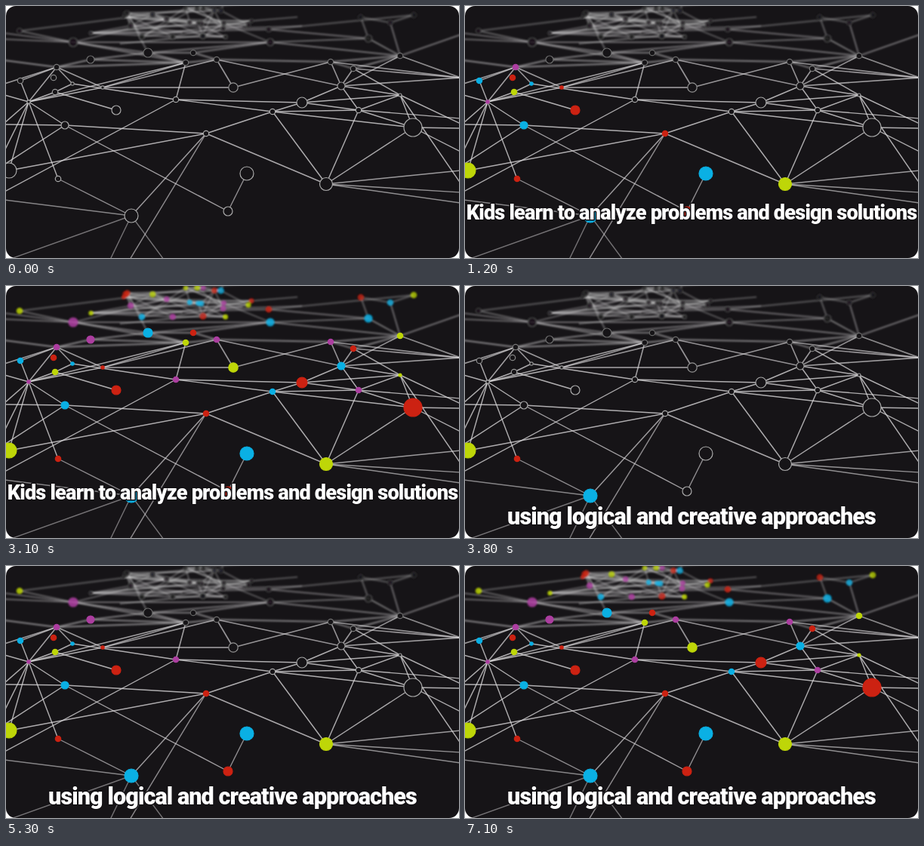
An HTML page that plays this animation: 600 px wide and 334 px high, repeating every 7.4 s.

```html
<!DOCTYPE html>
<html lang="en">
<head>
<meta charset="utf-8">
<title>Network</title>
<style>
  html, body { margin: 0; width: 100%; height: 100%; overflow: hidden; background: #fff; }
  svg { display: block; width: 100vw; height: 100vh; }
  text {
    font-weight: 900; font-stretch: 62.5%; font-variation-settings: "wdth" 62.5;
    letter-spacing: -0.03em; text-anchor: middle;
    fill: #fff; stroke: #131114; stroke-width: 3px; stroke-linejoin: round; paint-order: stroke;
  }
</style>
</head>
<body>
<svg viewBox="0 0 600 334">
  <defs>
    <clipPath id="card"><rect width="600" height="334" rx="13"/></clipPath>
    <filter id="soft" x="-10" y="-20" width="620" height="160" filterUnits="userSpaceOnUse"><feGaussianBlur stdDeviation="0.8"/></filter>
  </defs>
  <g clip-path="url(#card)">
    <rect width="600" height="334" fill="#161417"/>
    <g id="farLines" filter="url(#soft)"></g>
    <g id="lines"></g>
    <g id="farDots" filter="url(#soft)"></g>
    <g id="dots"></g>
    <text id="first" x="300" y="273" dy="0.36em">Kids learn to analyze problems and design solutions</text>
    <text id="second" x="300" y="305" dy="0.36em">using logical and creative approaches</text>
  </g>
</svg>
<script>
const LOOP = 7400, HALF = 3700, STEP = 100;
const COLORS = { r: '#cc2212', b: '#0ab0e4', y: '#bed608', p: '#ac3ea0' };
const $ = id => document.getElementById(id);
const clamp = v => Math.max(0, Math.min(1, v));

let seed = 11;
const rand = () => (seed = seed * 16807 % 2147483647) / 2147483647;

function add(parent, tag, attrs) {
  const el = document.createElementNS('http://www.w3.org/2000/svg', tag);
  for (const key in attrs) el.setAttribute(key, attrs[key]);
  return $(parent).appendChild(el);
}

// The light sweeps from the bottom left to the top right, slowest in the middle.
function litAt(x, y) {
  const v = 18 - y + 0.36 * x;
  return Math.max(STEP, 1540 + 12.1 * v / (1 + Math.abs(v) / 360));
}

const nodes = {};
function addNode(name, x, y, r = 3.7) {
  const far = y < 60, tone = 60 + 110 * clamp((y - 20) / 110);
  const el = add(far ? 'farDots' : 'dots', 'circle', {
    cx: x, cy: y, r, 'stroke-width': 1.2, opacity: far ? 0.72 + y / 300 : 1
  });
  nodes[name] = { x, y, el, color: COLORS[name[0]], edge: `rgb(${tone},${tone},${tone})`, start: litAt(x, y) };
}

// Key nodes by colour: x, y and, where it is not the usual one, the radius.
const spots = {
  r: [[69, 229], [294, 272, 6], [146, 138, 6], [63, 95], [265, 169], [128, 108, 2.2],
      [539, 161, 12], [392, 128, 7], [248, 62], [460, 83], [348, 31], [470, 15]],
  b: [[166, 278, 9], [78, 158, 5], [319, 222, 9], [19, 99], [88, 103, 2.2], [353, 140],
      [188, 62, 6], [444, 106, 5], [350, 48, 5], [480, 43, 5], [509, 22]],
  y: [[4, 218, 10], [65, 114], [424, 236, 8.5], [301, 108, 6.2], [238, 75], [18, 33],
      [522, 118, 2], [522, 66], [540, 12]],
  p: [[30, 127, 2.2], [67, 81], [225, 124], [112, 71, 5], [279, 71], [89, 48, 6],
      [467, 138], [430, 74]]
};
for (const c in spots) spots[c].forEach((spot, i) => addNode(c + i, ...spot));

function line(a, b) {
  const y = (a.y + b.y) / 2, depth = clamp((115 - y) / 90);
  add(y < 80 ? 'farLines' : 'lines', 'line', {
    x1: a.x, y1: a.y, x2: b.x, y2: b.y, stroke: '#dcdadc',
    'stroke-width': 1.4 + depth,
    'stroke-opacity': 0.78 - 0.5 * depth - 0.3 * clamp((y - 190) / 110)
  });
}

// Each hub, then the nodes it connects to.
const links = `b0 r4 r0, r4 y0 b1 b5 y2, b1 p0 r1, r1 b2, r0 p0, p0 y0 p1 r5 y4 b3,
  y1 r2 b4 p0, r5 y4 p4 y3, b4 p2 p1, p1 b3 r5 y4, p3 y4 p1 b6, p2 y4 r7 b5, y3 p4 p7,
  b5 r7 y2 p6 r6, r7 b7 p6 y6, y2 p6 r6, p6 b7 r6 y6, b7 p7 r9 y7 y6 p4, y6 r6 r9,
  p7 r9 y7 p4, y4 p4 b6, b6 r8 b8 p5, r8 p4 b8, y7 b8 b9 b10 r9, b9 r10 r11 b8,
  b10 r11 y8, y8 r10, p5 b8 y4, y5 p5`;
for (const link of links.split(',')) {
  const [hub, ...ends] = link.trim().split(' ').map(name => nodes[name]);
  ends.forEach(end => line(hub, end));
}

// Lines spread evenly from a node to a stretch of the stage's border.
function fan(name, x0, y0, x1, y1, count) {
  for (let i = 0; i < count; i++) {
    const k = count > 1 ? i / (count - 1) : 0;
    line(nodes[name], { x: x0 + (x1 - x0) * k, y: y0 + (y1 - y0) * k });
  }
}
const L = -2, R = 602, B = 336;
fan('b0', L, 257, L, 338, 2);
fan('b0', 138, B, 209, B, 2);
fan('r4', 164, B, 164, B, 1);
fan('p2', L, 246, L, 246, 1);
fan('b1', L, 157, L, 210, 2);
fan('p0', L, 118, L, 192, 3);
fan('p1', L, 72, L, 103, 2);
fan('p5', L, 36, L, 44, 2);
fan('y2', R, 218, R, 261, 2);
fan('y2', R, 247, R, 247, 1);
fan('p6', R, 149, R, 149, 1);
fan('r6', R, 162, R, 193, 2);
fan('y6', R, 156, R, 235, 2);
for (const name of ['b7', 'r9', 'p7', 'y7']) fan(name, R, 95, R, 95, 1);
fan('y7', R, 38, R, 38, 1);

// Hazy crowd near the horizon, tangled with itself.
const CROWD = 24, crowd = [];
for (let i = 0; i < CROWD; i++) {
  const name = 'rbyp'[i % 4] + 'Far' + i;
  addNode(name, 225 + 125 * (rand() + rand() - 1), 2 + 41 * rand(), 2.4 + 1.5 * rand());
  crowd.push(nodes[name]);
}
crowd.forEach((n, i) => {
  line(n, crowd[(i + 1) % CROWD]);
  line(n, crowd[(i + 7) % CROWD]);
  if (i % 3 == 0) line(n, { x: n.x + 320 * (rand() - 0.5), y: n.y + 24 * (rand() - 0.5) });
});
for (const name of ['y5', 'p5', 'b6', 'b8', 'r10']) line(nodes[name], crowd[Math.floor(rand() * CROWD)]);

// Use the narrowest heavy face on hand, sized so the caption spans its width.
function fit(el, width) {
  const measure = face => {
    el.style.fontFamily = `"${face}", sans-serif`;
    el.style.fontSize = '100px';
    return el.getComputedTextLength();
  };
  const [best] = ['Noto Sans', 'Open Sans', 'Roboto', 'DejaVu Sans']
    .map(face => ({ face, w: measure(face) })).sort((a, b) => a.w - b.w);
  measure(best.face);
  el.style.fontSize = 100 * width / best.w + 'px';
}
fit($('first'), 597);
fit($('second'), 488);

function draw(ms) {
  const t = Math.floor(ms % LOOP / STEP) * STEP, u = t % HALF;
  for (const n of Object.values(nodes)) {
    const lit = u >= n.start;
    n.el.setAttribute('fill', lit ? n.color : '#161417');
    n.el.setAttribute('stroke', lit ? n.color : n.edge);
  }
  $('first').style.display = t >= STEP && t < HALF ? '' : 'none';
  $('second').style.display = t >= HALF ? '' : 'none';
}

const begin = performance.now();
function tick() {
  draw(performance.now() - begin);
  requestAnimationFrame(tick);
}
tick();
</script>
</body>
</html>
```
